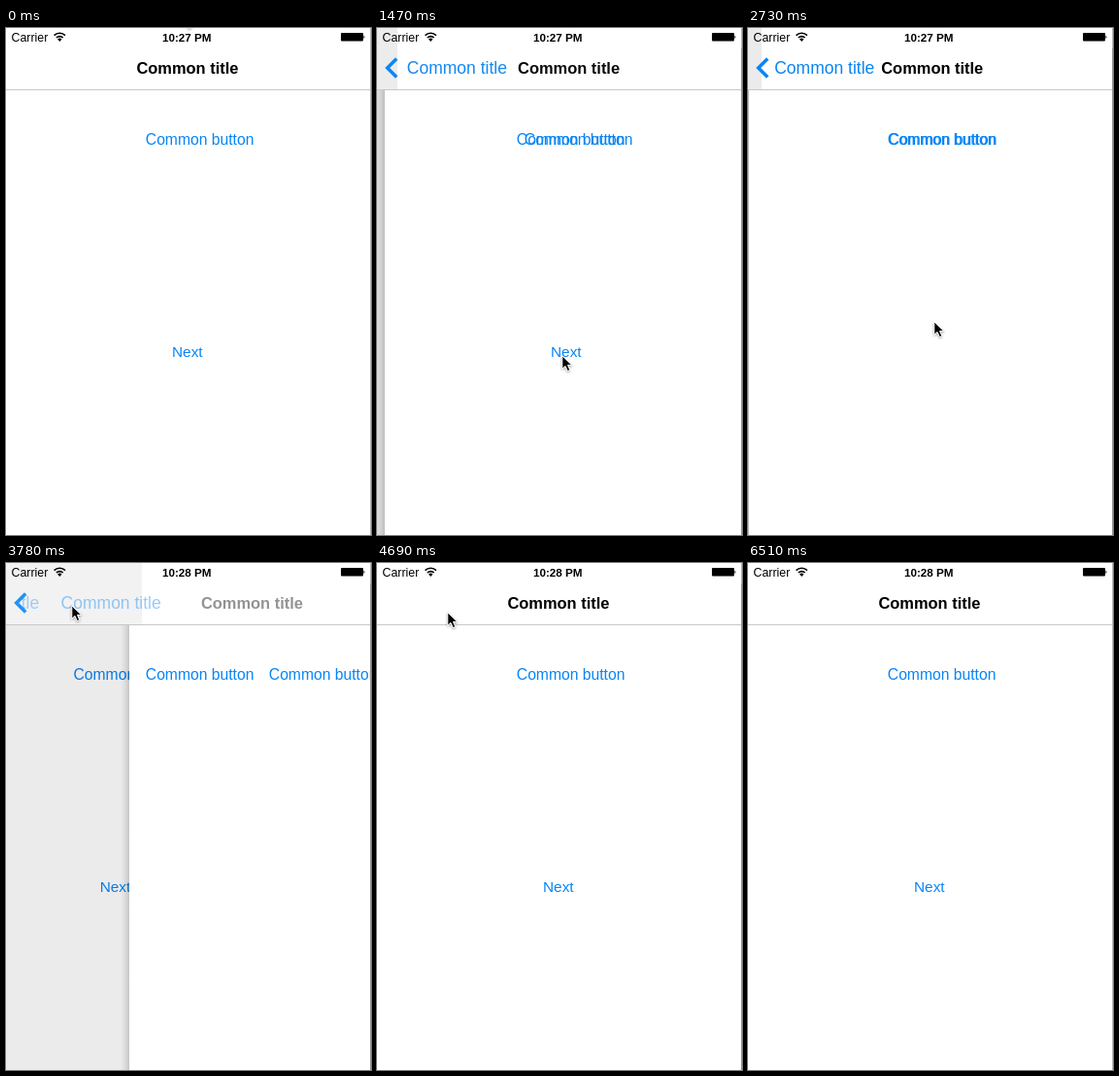
Recreate the animation shown at these times as an HTML page. Size 376 by 521 pixels, loop 6580 ms.

```html
<!DOCTYPE html>
<html lang="en">
<head>
<meta charset="utf-8">
<title>Navigation transition</title>
<style>
  html, body { margin: 0; width: 100%; height: 100%; overflow: hidden; background: #fff; }
  svg { display: block; width: 376px; height: 521px; }
  text { font-family: "Liberation Sans", Arial, sans-serif; white-space: pre; }
  .blue { fill: #0785f6; }
  .title { font-size: 16.45px; font-weight: bold; }
  .back { font-size: 17.5px; }
  .button { font-size: 15.7px; }
  .next { font-size: 15.4px; }
</style>
</head>
<body>
<svg viewBox="0 0 376 521">
  <defs>
    <linearGradient id="shade">
      <stop offset="0" stop-opacity="0"/>
      <stop offset=".5" stop-opacity=".06"/>
      <stop offset="1" stop-opacity=".16"/>
    </linearGradient>
    <clipPath id="labels"><rect x="14" y="20" width="362" height="43"/></clipPath>
    <filter id="soft" x="-50%" y="-50%" width="200%" height="200%">
      <feDropShadow dx="0" dy="1" stdDeviation=".9" flood-opacity=".4"/>
    </filter>
  </defs>
  <rect width="376" height="521" fill="#fff"/>

  <g id="lower">
    <text class="blue button" x="143.8" y="119.5">Common button</text>
    <text id="lowerNext" class="blue next" x="171" y="338.3">Next</text>
  </g>
  <rect id="dim" y="64" width="376" height="457"/>
  <rect id="shadow" y="64" width="9" height="457" fill="url(#shade)"/>
  <g id="upper">
    <rect y="64" width="376" height="457" fill="#fff"/>
    <text class="blue button" x="143.8" y="119.5">Common button</text>
    <text id="upperNext" class="blue next" x="171" y="338.3">Next</text>
  </g>
  <text id="shared" class="blue button" x="143.8" y="119.5">Common button</text>

  <rect width="376" height="63" fill="#fff"/>
  <rect id="barDim" height="63"/>
  <rect y="63" width="376" height="1" fill="#c8c8c8"/>
  <g clip-path="url(#labels)">
    <text id="lowerBack" class="blue back" y="47">Common title</text>
    <text id="upperBack" class="blue back" y="47">Common title</text>
    <text id="lowerTitle" class="title" y="47">Common title</text>
    <text id="upperTitle" class="title" y="47">Common title</text>
  </g>
  <path id="chevron" d="M20.2 31.5 10.7 41l9.5 9.5" fill="none" stroke-width="3.5"/>

  <text x="5.5" y="13.7" font-size="12.4">Carrier</text>
  <g fill="none" stroke="#000" stroke-width="1.6">
    <path d="M49.6 7.6a8 8 0 0 1 11.4 0"/>
    <path d="M51.9 10a4.800 4.800 0 0 1 6.800 0"/>
  </g>
  <path d="M55.3 14l-2.200-2.400a3.200 3.200 0 0 1 4.400 0z"/>
  <text id="clock" x="160.900" y="13.600" font-size="11.700" font-weight="bold"></text>
  <rect x="345" y="5" width="23" height="8.500" rx="1"/>
  <path d="M368.500 7.500q2 1.800 0 3.600z"/>
  <rect x="375" width="1" height="21" fill="#bbb"/>
  <rect id="edge" x="375" y="21" width="1" height="500"/>

  <path id="cursor" d="M0 0V13.500L3.200 10.600 5.500 15.800 8 14.700 5.700 9.600H10z"
    fill="#000" stroke="#fff" stroke-width="1" stroke-linejoin="round" filter="url(#soft)"/>
</svg>
<script>
const LOOP = 6580, STEP = 70, WIDTH = 375;
const BACK_X = 26.3, TITLE_X = [134.4, 135.2];

const el = {};
document.querySelectorAll("svg [id]").forEach(node => el[node.id] = node);

// from: when the screen pair is shown, go: when it starts to slide
const moves = [
  { from: 0, go: 1150, low: 0, push: true },
  { from: 2000, go: 2291, low: 1, push: true },
  { from: 3500, go: 3713, low: 1, push: false },
  { from: 4070, go: 4070, low: 0, push: false }
];

// time, x, y of the pointer tip
const path = [
  [0, 182, -16], [210, 209, 60], [350, 215, 150], [560, 200, 290],
  [700, 190, 335], [770, 190, 336], [1820, 190, 336], [1960, 191, 335],
  [2430, 191, 335], [2660, 191, 301], [2940, 191, 301], [3430, 76, 66],
  [3640, 67, 43], [4340, 67, 43], [4480, 72, 50], [4690, 72, 50],
  [5040, 148, 210], [5320, 186, 305], [5530, 197, 333], [5600, 197, 333],
  [5670, 197, 240], [5740, 197, 240]
];

const clamp = v => Math.max(0, Math.min(1, v));
const mix = (a, b, k) => a + (b - a) * k;
const set = (node, attrs) => {
  for (const key in attrs) node.setAttribute(key, attrs[key]);
};
const shift = (node, x, y = 0) => set(node, { transform: `translate(${x} ${y})` });

// critically damped spring
function spring(ms, rate) {
  if (ms <= 0) return 0;
  if (ms > 560) return 1;
  const x = rate * ms / 1000;
  return 1 - (1 + x) * Math.exp(-x);
}

function pointer(t) {
  const i = path.findIndex(p => p[0] > t);
  if (i < 1) return null;
  const a = path[i - 1], b = path[i];
  const k = (t - a[0]) / (b[0] - a[0]);
  return [mix(a[1], b[1], k), mix(a[2], b[2], k)];
}

function drawPages(t, cover, low) {
  const x = Math.round(WIDTH * (1 - cover));
  const pressed = t >= 1050 && t < 1750 || t >= 2170 && t < 2900;
  const dim = 0.12 * cover;
  const sliding = cover > 0 && cover < 1;
  shift(el.lower, -0.3 * WIDTH * cover);
  set(el.lowerNext, { opacity: pressed ? 0.25 : 1 });
  set(el.upperNext, { opacity: low ? 0 : 1 });
  set(el.dim, { opacity: dim });
  shift(el.shadow, x - 9);
  set(el.shadow, { opacity: sliding ? 1 : 0 });
  shift(el.upper, x);
  set(el.upper, { opacity: cover > 0 ? 1 : 0 });
  set(el.shared, { opacity: sliding ? 1 : 0 });
  set(el.barDim, { width: sliding ? Math.min(376, x + 13) : 0, opacity: dim * 0.64 });
}

function drawBar(t, ms, cover, { low, push, go }) {
  const q = spring(ms, 15.5);
  const s = push ? q : 1 - q;
  const fade = ms <= 0 ? 1 : q === 1 ? 0 : Math.exp(-ms / 77);
  const late = clamp((q - 0.3) / 0.7);
  const held = !push && low === 1 && t >= 3640 && t < go;
  const meet = mix(TITLE_X[low], BACK_X, s);
  set(el.lowerTitle, { x: meet, opacity: push ? fade : late });
  set(el.upperBack, { x: meet, opacity: push ? late : held ? 0.3 : fade });
  set(el.upperTitle, { x: TITLE_X[1] + 236 * (1 - s), opacity: push ? q : fade });
  set(el.lowerBack, {
    x: BACK_X - 132 * s,
    opacity: low === 0 ? 0 : push ? fade : clamp(q * 1.25)
  });
  const tint = low ? 1 : cover;
  const rgb = [mix(205, 7, tint), mix(205, 133, tint), mix(205, 246, tint)].map(Math.round);
  let alpha = low ? 1 : clamp(cover * 1.5);
  if (held) alpha = 0.3;
  else if (!push && low && ms < 90) alpha = mix(0.3, 1, clamp(ms / 80));
  set(el.chevron, { stroke: `rgb(${rgb})`, opacity: alpha });
}

function draw(t) {
  const move = moves.filter(m => m.from <= t).pop();
  const ms = t - move.go;
  const p = spring(ms, 18);
  const cover = move.push ? p : 1 - p;
  drawPages(t, cover, move.low);
  drawBar(t, ms, cover, move);
  el.clock.textContent = t < 3290 ? "10:27 PM" : "10:28 PM";
  set(el.edge, { fill: t >= 1050 && t < 6510 ? "#999" : "#bbb" });
  const tip = pointer(t);
  set(el.cursor, { visibility: tip ? "visible" : "hidden" });
  if (tip) shift(el.cursor, tip[0] + 0.8, tip[1] + 0.8);
}

const begin = performance.now();
function tick() {
  const t = (performance.now() - begin) % LOOP;
  draw(Math.floor(t / STEP) * STEP);
  requestAnimationFrame(tick);
}
tick();
</script>
</body>
</html>
```
